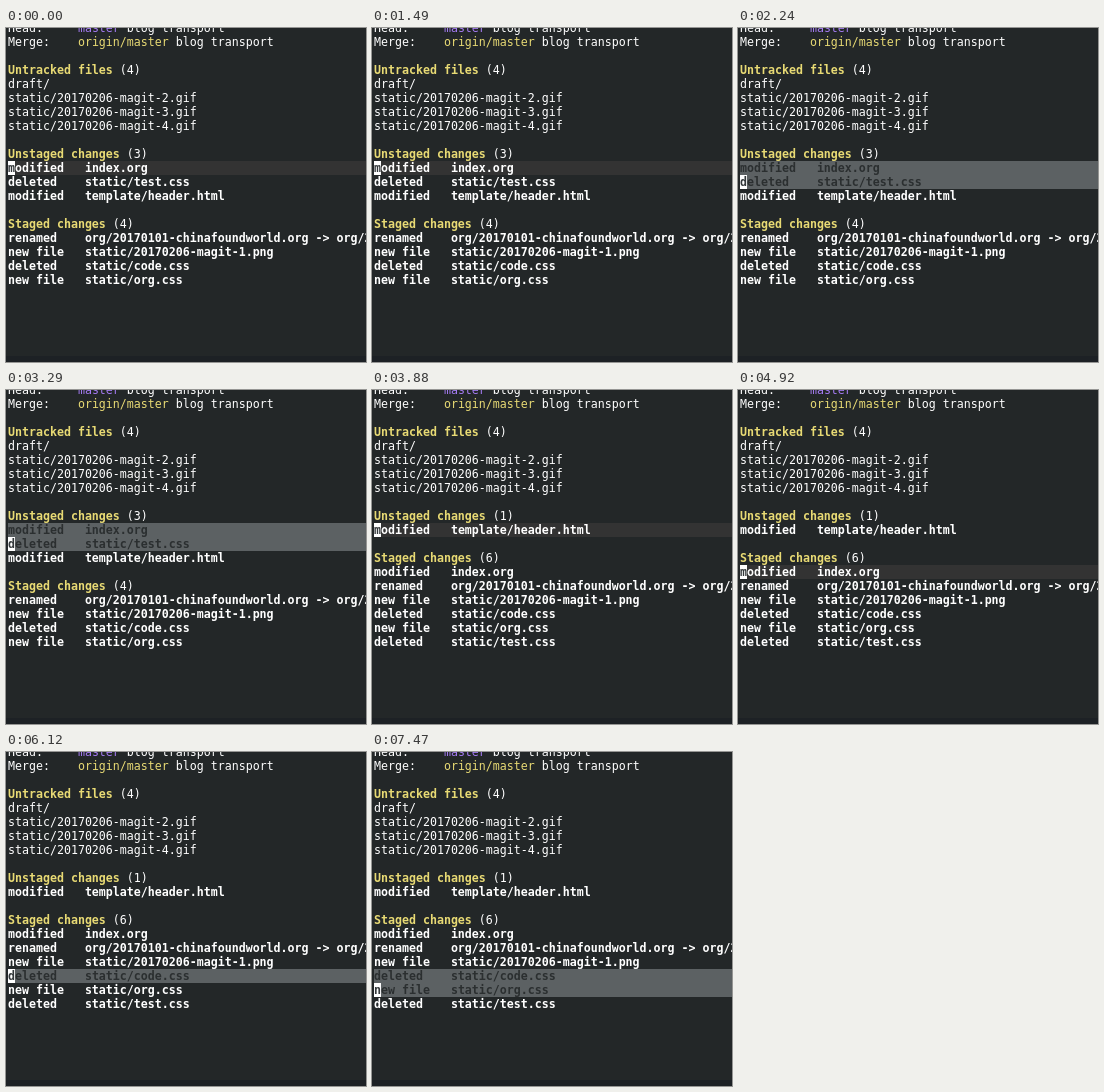
Animation of 360 by 334 pixels, one loop 8 s. Source, as an HTML page:

```html
<!DOCTYPE html>
<html lang="en">
<head>
<meta charset="utf-8">
<style>
  html, body { margin: 0; width: 100%; height: 100%; overflow: hidden; background: #232728; }
  #screen {
    position: relative; width: 360px; height: 334px; overflow: hidden;
    font: 11.627px/14px "DejaVu Sans Mono", "Noto Sans Mono", monospace;
    color: #fff; white-space: pre;
  }
  .row { position: absolute; left: 2px; width: 358px; height: 14px; overflow: hidden; }
  .file, b { font-weight: 700; }
  b, .remote { color: #e8da74; }
  .local { color: #a67cf5; }
  .current { background: #333; }
  .region { background: #5c6163; color: #2b2f30; }
  .cursor { display: inline-block; width: 7px; height: 14px; background: #fff; color: #33383a; vertical-align: top; }
  #bar { position: absolute; left: 0; top: 328px; width: 360px; height: 6px; background: #1d2125; }
</style>
</head>
<body>
<div id="screen"><div id="rows"></div><div id="bar"></div></div>
<script>
const LOOP = 8000, ROW = 14, TOP = -7;

const plain = text => ({ text });
const ref = (label, kind, name) =>
  ({ text: label.padEnd(10), html: `${label.padEnd(10)}<span class="${kind}">${name}</span> blog transport` });
const title = (name, count) => ({ text: name, html: `<b>${name}</b> (${count})`, head: name });
const file = (status, path) => ({ text: status.padEnd(11) + path, type: 'file' });

const index = file('modified', 'index.org');
const test = file('deleted', 'static/test.css');
const header = file('modified', 'template/header.html');
const staged = [
  file('renamed', 'org/20170101-chinafoundworld.org -> org/20170101'),
  file('new file', 'static/20170206-magit-1.png'),
  file('deleted', 'static/code.css'),
  file('new file', 'static/org.css')
];
const blank = plain('');

const page = (unstaged, staged) => [
  ref('Head:', 'local', 'master'),
  ref('Merge:', 'remote', 'origin/master'),
  blank,
  title('Untracked files', 4),
  plain('draft/'),
  ...[2, 3, 4].map(n => plain(`static/20170206-magit-${n}.gif`)),
  blank,
  title('Unstaged changes', unstaged.length), ...unstaged,
  blank,
  title('Staged changes', staged.length), ...staged
];
const before = page([index, test, header], staged);
const after = page([header], [index, ...staged, test]);

// start time, page, cursor row, cursor shown, first and last lit row, selecting
const steps = [
  [0, before, 10, 1, 10, 10, 0],
  [150, before, 10, 0, 10, 10, 0],
  [600, before, 10, 1, 10, 10, 0],
  [1050, before, 10, 0, 10, 10, 0],
  [1490, before, 10, 1, 10, 10, 0],
  [1790, before, 10, 1, 10, 10, 1],
  [2240, before, 11, 1, 10, 11, 1],
  [2840, before, 11, 0, 10, 11, 1],
  [3290, before, 11, 1, 10, 11, 1],
  [3880, after, 10, 1, 10, 10, 0],
  [4480, after, 11, 1, 9, 11, 0],
  [4770, after, 12, 1, 12, 18, 0],
  [4920, after, 13, 1, 13, 13, 0],
  [5070, after, 14, 1, 14, 14, 0],
  [5220, after, 15, 1, 15, 15, 0],
  [5520, after, 16, 1, 16, 16, 0],
  [6120, after, 16, 1, 16, 16, 1],
  [6570, after, 17, 1, 16, 17, 1],
  [7020, after, 17, 0, 16, 17, 1],
  [7470, after, 17, 1, 16, 17, 1]
];

const escape = s => s.replace(/>/g, '&gt;');
const block = s => `<span class="cursor">${s}</span>`;

function content(line, hasCursor) {
  const html = line.html || escape(line.text);
  if (!hasCursor) return html;
  if (line.head) return html.replace('<b>' + line.head[0], '<b>' + block(line.head[0]));
  return block(line.text[0] || ' ') + escape(line.text.slice(1));
}

function draw([, lines, cursor, shown, first, last, selecting]) {
  rows.innerHTML = lines.map((line, i) => {
    const lit = i >= first && i <= last ? (selecting ? 'region' : 'current') : '';
    return `<div class="row ${line.type || ''} ${lit}" style="top:${TOP + i * ROW}px">` +
      content(line, shown && i === cursor) + '</div>';
  }).join('');
}

const rows = document.getElementById('rows');
let step;
function tick() {
  const t = performance.now() % LOOP;
  const next = steps.findLast(s => s[0] <= t);
  if (next !== step) draw(step = next);
  requestAnimationFrame(tick);
}
tick();
</script>
</body>
</html>
```
